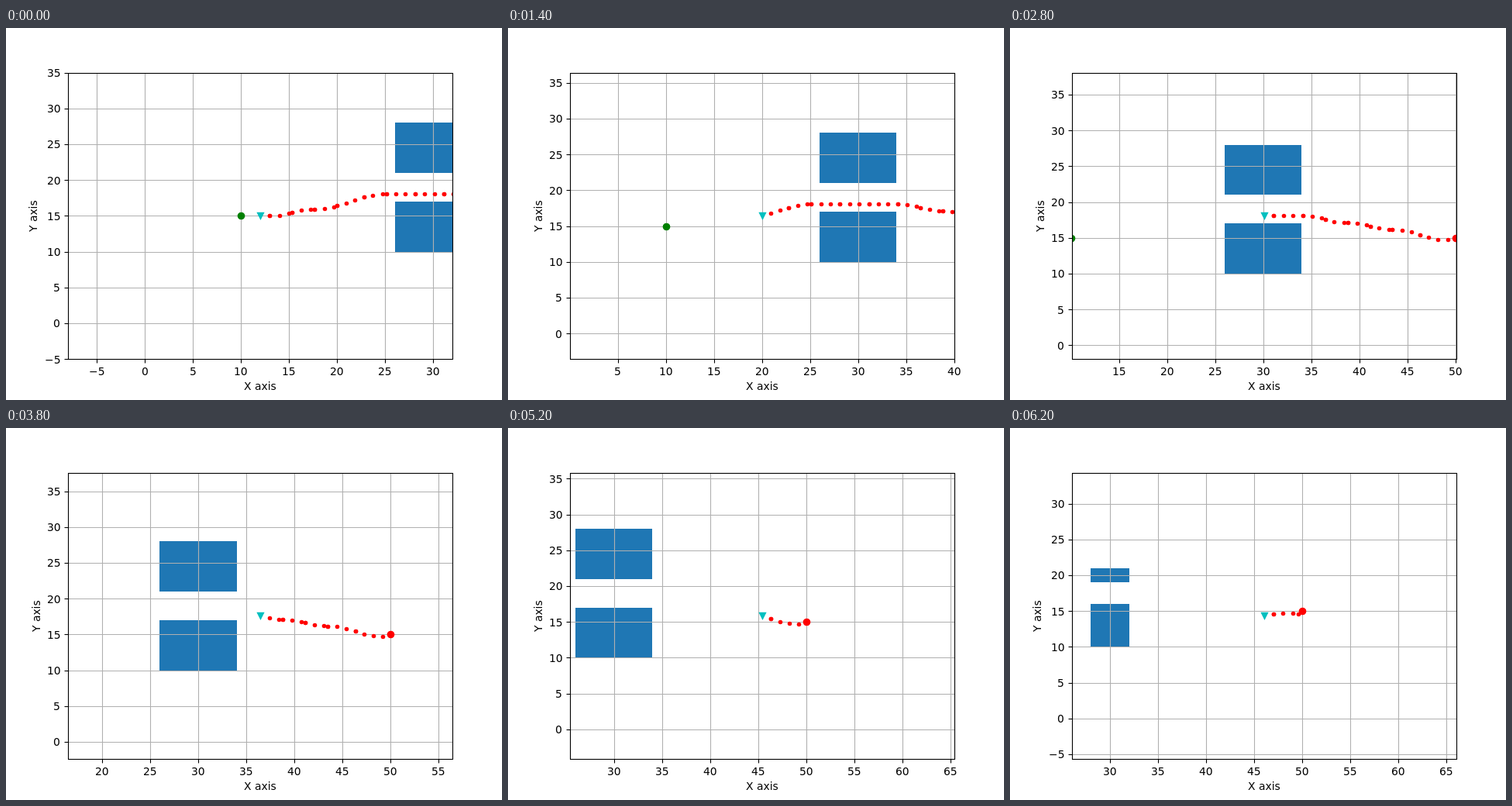
Animation of 640x480 px, one loop 6300 ms. Source, as an HTML page with a canvas:

```html
<!DOCTYPE html>
<html lang="en">
<head>
<meta charset="utf-8">
<title>Path following</title>
<style>
  html, body { margin: 0; width: 100%; height: 100%; overflow: hidden; background: #fff; }
  canvas { display: block; }
</style>
</head>
<body>
<canvas id="plot" width="640" height="480"></canvas>
<script>
const ctx = document.getElementById('plot').getContext('2d');
const STEP = 100, REACH = 20, TICK = 5;
const L = 80, R = 576, T = 57.6, B = 427.2;
const MID_X = (L + R) / 2, MID_Y = (T + B) / 2;
const PX = (R - L) / (2 * REACH), PY = (B - T) / (2 * REACH);
const PT = 100 / 72, LINE = 0.8 * PT;
const TURN_RADIUS = 6;

// Moves the vehicle can make: steering side and distance.
const straight = { side: 0, dist: 3 };
const left = { side: 1, dist: 2.4 };
const right = { side: -1, dist: 2.4 };
const stretch = (move, dist) => ({ side: move.side, dist });

// Pose after driving a distance along a straight line or an arc.
function advance({ x, y, dir }, side, dist) {
  const turn = side * dist / TURN_RADIUS;
  const chord = side ? 2 * TURN_RADIUS * Math.sin(Math.abs(turn) / 2) : dist;
  return {
    x: x + chord * Math.cos(dir + turn / 2),
    y: y + chord * Math.sin(dir + turn / 2),
    dir: dir + turn
  };
}

// One point per unit of distance; a joint between moves is visited twice.
function drive(pose, moves) {
  const path = [];
  for (const { side, dist } of moves) {
    for (let d = 0; d < dist; d++) path.push(advance(pose, side, d));
    pose = advance(pose, side, dist);
    path.push(pose);
  }
  return path;
}

const gapPath = drive({ x: 10, y: 15, dir: 0 }, [
  straight, left, right, left, straight, right,
  straight, straight, straight,
  right, left, right, left,
  stretch(right, 3), stretch(left, 3)
]).slice(2);
const exitPath = drive({ x: 43.14, y: 13.69, dir: 0.217 }, [
  stretch(straight, 1), straight, stretch(right, 2.6)
]);

// Blocks are x0, x1, y0, y1.
const scenes = [
  { path: gapPath, steps: gapPath.length, blocks: [[26, 34, 10, 17], [26, 34, 21, 28]] },
  { path: exitPath, steps: 5, blocks: [[28, 32, 10, 16], [28, 32, 19, 21]] }
];
const TOTAL = scenes[0].steps + scenes[1].steps;

const snap = v => Math.floor(v + 0.5);
const center = v => snap(v) + 0.5;

function line(x0, y0, x1, y1, color) {
  ctx.strokeStyle = color;
  ctx.lineWidth = LINE;
  ctx.beginPath();
  ctx.moveTo(x0, y0);
  ctx.lineTo(x1, y1);
  ctx.stroke();
}

function dot(x, y, size, color) {
  ctx.fillStyle = color;
  ctx.beginPath();
  ctx.arc(center(x), center(y), (size + 1) * PT / 2, 0, 2 * Math.PI);
  ctx.fill();
}

function vehicle(x, y) {
  ctx.fillStyle = ctx.strokeStyle = '#00bfbf';
  ctx.lineWidth = PT;
  ctx.beginPath();
  ctx.moveTo(x - 4, y - 4);
  ctx.lineTo(x + 4, y - 4);
  ctx.lineTo(x, y + 4);
  ctx.closePath();
  ctx.fill();
  ctx.stroke();
}

function text(str, x, y, align) {
  const w = ctx.measureText(str).width;
  ctx.fillText(str, snap(x - w * align), snap(y));
}

function ticks(mid) {
  const list = [];
  const first = Math.ceil((mid - REACH) / TICK) * TICK;
  for (let v = first; v <= mid + REACH; v += TICK) list.push(v);
  return list;
}

const label = v => String(v).replace('-', '\u2212');

function draw(step) {
  let scene = scenes[0];
  if (step >= scene.steps) {
    step -= scene.steps;
    scene = scenes[1];
  }
  const here = scene.path[step];
  const sx = x => MID_X + (x - here.x) * PX;
  const sy = y => MID_Y - (y - here.y) * PY;
  const xs = ticks(here.x), ys = ticks(here.y);
  const x0 = center(L), x1 = center(R), y0 = center(T), y1 = center(B);

  ctx.fillStyle = '#fff';
  ctx.fillRect(0, 0, 640, 480);

  ctx.save();
  ctx.beginPath();
  ctx.rect(L, snap(T), R - L, snap(B) - snap(T));
  ctx.clip();
  ctx.fillStyle = '#1f77b4';
  for (const [west, east, south, north] of scene.blocks) {
    const x = snap(sx(west)), y = snap(sy(north));
    ctx.fillRect(x, y, snap(sx(east)) - x, snap(sy(south)) - y);
  }
  for (const v of xs) line(center(sx(v)), y0, center(sx(v)), y1, '#b0b0b0');
  for (const v of ys) line(x0, center(sy(v)), x1, center(sy(v)), '#b0b0b0');
  dot(sx(10), sy(15), 6, '#008000');
  dot(sx(50), sy(15), 6, '#f00');
  for (const p of scene.path.slice(step + 1)) dot(sx(p.x), sy(p.y), 3, '#f00');
  vehicle(center(MID_X), center(MID_Y));
  ctx.restore();

  ctx.strokeStyle = '#000';
  ctx.lineWidth = LINE;
  ctx.strokeRect(x0, y0, x1 - x0, y1 - y0);

  ctx.font = 10 * PT + 'px "DejaVu Sans", sans-serif';
  ctx.fillStyle = '#000';
  for (const v of xs) {
    const x = center(sx(v));
    line(x, y1, x, y1 + 5, '#000');
    text(label(v), sx(v), 448, 0.5);
  }
  for (const v of ys) {
    const y = center(sy(v));
    line(x0 - 5, y, x0, y, '#000');
    text(label(v), L - 7 * PT, sy(v) + 5.4, 1);
  }
  text('X axis', MID_X, 467, 0.5);

  // The side label makes room for a minus sign.
  ctx.save();
  ctx.translate(ys[0] < 0 ? 40 : 44, 243);
  ctx.rotate(-Math.PI / 2);
  text('Y axis', 0, 0, 0.5);
  ctx.restore();
}

const start = performance.now();
let shown = -1;
function tick() {
  const step = Math.floor((performance.now() - start) / STEP) % TOTAL;
  if (step !== shown) draw(shown = step);
  requestAnimationFrame(tick);
}
tick();
</script>
</body>
</html>
```
